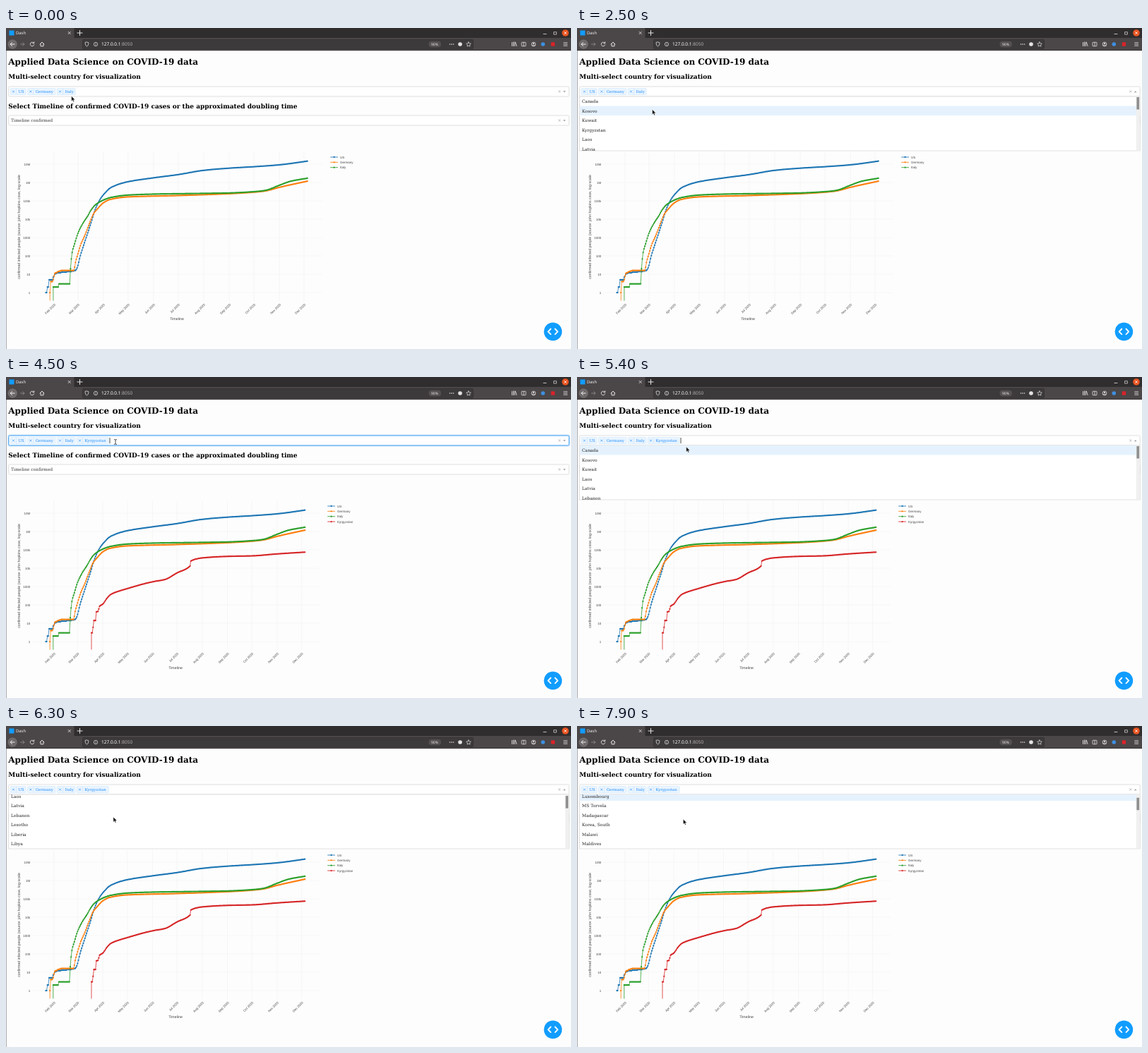
Write an HTML page that moves like this. It is 800 by 455 pixels and loops after 8 s.

```html
<!DOCTYPE html>
<html lang="en">
<head>
<meta charset="utf-8">
<title>Dash</title>
<style>
html, body { margin: 0; width: 100%; height: 100%; overflow: hidden; background: #fefdfe; }
svg { display: block; width: 100vw; height: 100vh; }
text { font-family: "DejaVu Serif", serif; text-rendering: geometricPrecision; white-space: pre; }
.ui text { font-family: "Noto Sans", sans-serif; }
.chart text { font-family: "Liberation Sans", Arial, sans-serif; font-size: 4.5px; fill: #444; }
.line { fill: none; stroke-linecap: round; stroke-linejoin: round; }
</style>
</head>
<body>
<svg id="stage" viewBox="0 0 800 455"></svg>
<script>
const LOOP = 8000, ROW = 13.5, LIST_TOP = 97;

// Markup helpers
const text = (x, y, size, fill, str, extra = '') =>
  `<text x="${x}" y="${y}" font-size="${size}" fill="${fill}" ${extra}>${str}</text>`;
const rect = (x, y, w, h, fill, extra = '') =>
  `<rect x="${x}" y="${y}" width="${w}" height="${h}" fill="${fill}" ${extra}/>`;
const circle = (x, y, r, fill, extra = '') => `<circle cx="${x}" cy="${y}" r="${r}" fill="${fill}" ${extra}/>`;
const line = (d, stroke, width = 1, extra = '') =>
  `<path class="line" d="${d}" stroke="${stroke}" stroke-width="${width}" ${extra}/>`;
const group = (id, body, extra = '') => `<g id="${id}" ${extra}>${body}</g>`;
const cross = (x, y, r, stroke, width) =>
  line(`M${x - r} ${y - r}l${2 * r} ${2 * r}m0 ${-2 * r}l${-2 * r} ${2 * r}`, stroke, width);

// Browser window
function browser() {
  const pale = '#e6e3e4';
  return rect(0, 0, 800, 14.5, '#302d2e') + rect(0, 0, 96.5, 14.5, '#4b4748') +
    rect(0, 14, 800, 18, '#4b4748') + rect(0, 31.5, 800, .6, '#2a2728') +
    rect(4.5, 3.5, 7, 7, '#119dff') +
    text(14, 9.4, 5.9, '#f4f2f3', 'Dash', 'id="tabTitle"') +
    cross(89.7, 7, 1.7, pale, .8) + line('M101 7h7M104.500 3.500v7', pale, 1) +
    line('M761 8.500h4', pale, .8) + line('M776 5.700h3.400v3.400h-3.400z', pale, .7) +
    circle(792, 7, 4.8, '#e95420') + cross(792, 7, 1.5, '#fff', .8) +
    circle(9.2, 23, 6.2, '#6d696a', 'stroke="#8a8687" stroke-width=".5"') +
    line('M12.200 23h-6m2.500-2.500l-2.500 2.500l2.500 2.500', '#f4f2f3', 1) +
    line('M20.500 23h5.500m-2.300-2.300l2.300 2.300l-2.300 2.300', '#8d898a', .9) +
    line('M39.500 21.500a2.800 2.800 0 1 0 .3 2.200m0-4v2h-2', pale, .9) +
    line('M48 23l3-3l3 3M49 22.500v3.300h4v-3.300', pale, 1) +
    rect(108.5, 16.5, 553, 13, '#3d3a3b', 'rx="1.5" stroke="#2f2c2d" stroke-width=".6"') +
    line('M114.500 20l2.400.8c0 2.500-.6 4.200-2.400 5.300c-1.800-1.100-2.400-2.800-2.400-5.300z', pale, .8) +
    circle(127, 23, 2.7, 'none', `stroke="${pale}" stroke-width=".7"`) + line('M127 23v1.300M127 21.600v.01', pale, .7) +
    text(135, 25.3, 6.5, '#fff', '127.0.0.1<tspan fill="#b3afb0">:8050</tspan>') +
    rect(598.5, 18.7, 17.5, 8.6, '#545051', 'rx="4"') + text(602, 25, 5, '#f0eeef', '90%') +
    [628.5, 631, 633.5].map(x => circle(x, 23, .8, pale)).join('') +
    circle(643, 23, 2.8, pale) +
    line('M655 19.800l1 2.100l2.300.3l-1.700 1.600l.4 2.300l-2-1.100l-2 1.100l.4-2.300l-1.700-1.600l2.300-.3z', pale, .7) +
    line('M716.500 20.500v5M718.500 20v5.500M720.300 20v5.500M721.500 20.500l1.500 5', pale, .9) +
    rect(730, 20.3, 6, 5.4, 'none', `stroke="${pale}" stroke-width=".8" rx=".6"`) + line('M733 20.500v5', pale, .8) +
    circle(747, 23, 2.9, 'none', `stroke="${pale}" stroke-width=".8"`) + circle(747, 22.2, 1.1, pale) +
    line('M745.300 24.800h3.400', pale, .8) +
    circle(760.3, 23, 2.8, '#3f8fe0') + rect(771.7, 20.3, 5.4, 5.4, '#d8232a') +
    line('M789.700 20.800h5M789.700 23h5M789.700 25.200h5', pale, .8) +
    rect(0, 32, .6, 423, '#777');
}

// Page controls
const tag = (x, w, name) =>
  rect(x, 85.6, w, 9, '#ebf5ff', 'rx=".8" stroke="#c2e0ff" stroke-width=".5"') +
  line(`M${x + 8.4} 85.600v9`, '#c2e0ff', .5) + cross(x + 4.3, 90.1, 1.2, '#1e8cff', .6) +
  text(x + 11.3, 92.1, 5.4, '#1e8cff', name);

const select = (y, id, down) =>
  rect(3.8, y, 793.4, 14, '#fff', `rx="1.600" stroke="#ccc" stroke-width=".6" id="${id}"`) +
  cross(783.7, y + 7, 1.3, '#999', .6) +
  `<path id="${id}Arrow" d="${down}" fill="#999"/>`;

const arrowDown = y => `M788.800 ${y}h3.800l-1.900 2z`;
const arrowUp = y => `M788.800 ${y + 2}h3.800l-1.900 -2z`;

// Chart data: day since 22 January, cumulative cases
const series = {
  US: { color: '#1f77b4', points: [[0,1],[1,1],[2,2],[3,2],[4,5],[7,5],[10,8],[12,11],[36,16],[38,22],[42,104],
    [48,711],[55,6400],[60,33800],[66,122e3],[70,214e3],[80,557e3],[100,11e5],[131,18e5],[161,27e5],[192,46e5],
    [223,605e4],[253,727e4],[284,92e5],[318,146e5]] },
  Germany: { color: '#ff7f0e', points: [[5,1],[6,4],[8,4],[11,11],[21,16],[34,16],[36,44],[39,130],[43,482],
    [47,1176],[53,5795],[58,19800],[63,37300],[70,77900],[79,122e3],[100,164e3],[161,195e3],[223,245e3],
    [253,296e3],[267,348e3],[284,545e3],[318,118e4]] },
  Italy: { color: '#2ca02c', points: [[9,2],[15,2],[16,3],[29,3],[30,20],[32,155],[35,453],[39,1694],[45,5883],
    [51,15100],[55,31500],[60,59e3],[70,11e4],[80,156e3],[100,207e3],[131,233e3],[223,27e4],[253,317e3],
    [267,372e3],[284,709e3],[298,118e4],[318,171e4]] },
  Kyrgyzstan: { color: '#d62728', points: [[56,3],[57,3],[59,14],[61,14],[62,42],[64,44],[66,84],[70,111],[75,228],
    [80,377],[100,769],[131,1817],[146,2400],[161,5500],[177,13100],[178,24600],[192,36300],[223,44e3],
    [253,47e3],[284,6e4],[318,75e3]] }
};

// Monotone cubic interpolation of log10(cases), one sample per day
function dailyLog(points) {
  const p = points.map(([d, v]) => [d, Math.log10(v)]);
  const slope = i => (p[i + 1][1] - p[i][1]) / (p[i + 1][0] - p[i][0]);
  const tangent = p.map((_, i) => {
    if (i === 0) return slope(0);
    if (i === p.length - 1) return slope(i - 1);
    const a = slope(i - 1), b = slope(i);
    return a * b > 0 ? 2 * a * b / (a + b) : 0;
  });
  const out = [];
  for (let d = p[0][0], i = 0; d <= p[p.length - 1][0]; d++) {
    while (i < p.length - 2 && d > p[i + 1][0]) i++;
    const h = p[i + 1][0] - p[i][0], u = (d - p[i][0]) / h, w = 1 - u;
    let y = w * w * (1 + 2 * u) * p[i][1] + u * u * (3 - 2 * u) * p[i + 1][1] +
      h * u * w * (w * tangent[i] - u * tangent[i + 1]);
    if (y < 1.5) y = Math.log10(Math.round(10 ** y));
    out.push([d, y]);
  }
  return out;
}

function chart(id, names, perDay, right, legendX) {
  const X = d => 56.4 + d * perDay, Y = log => 375 - 26 * log;
  const months = ['Feb', 'Mar', 'Apr', 'May', 'Jun', 'Jul', 'Aug', 'Sep', 'Oct', 'Nov', 'Dec'];
  let body = rect(30, 174, 480, 245, '#fefdfe');
  months.forEach((m, i) => {
    const x = X((Date.UTC(2020, i + 1, 1) - Date.UTC(2020, 0, 22)) / 864e5);
    body += line(`M${x} 176V386.500`, '#eee', .5) +
      text(0, 0, 4.5, '#444', m + ' 2020', `text-anchor="end" transform="translate(${x + 2.4} 392.500) rotate(-45)"`);
  });
  ['1', '10', '100', '1000', '10k', '100k', '1M', '10M'].forEach((label, i) => {
    body += line(`M36.500 ${Y(i)}H${right}`, '#eee', .5) +
      text(34.2, Y(i) + 1.6, 4.5, '#444', label, 'text-anchor="end"');
  });
  let traces = '';
  names.forEach((name, i) => {
    const { color, points } = series[name];
    const at = dailyLog(points).map(([d, v]) => `${X(d).toFixed(2)} ${Y(v).toFixed(2)}`);
    const drop = points[0][0] ? `M${X(points[0][0])} 400L` : 'M';
    traces += line(drop + at.join('L'), color, .8) + line(at.map(p => `M${p}h.01`).join(''), color, 2.25);
    const y = 183 + i * 7.35;
    body += line(`M${legendX} ${y}h10`, color, .85) + circle(legendX + 5, y, 1.15, color) +
      text(legendX + 13.4, y + 1.6, 4.5, '#444', name);
  });
  body += `<g clip-path="url(#plotClip)">${traces}</g>` +
    text((36.5 + right) / 2, 413.6, 5.25, '#444', 'Timeline', 'text-anchor="middle" style="font-size:5.25px"') +
    text(0, 0, 5.25, '#444', 'confirmed infected people (source: john hopkins csse, log-scale',
      'text-anchor="middle" style="font-size:5.25px" transform="translate(20 282) rotate(-90)"');
  return group(id, body, 'class="chart"');
}

function modebar() {
  const icons = [370, 382, 391, 400, 410, 423, 432, 441, 450, 463, 473, 482, 494];
  return icons.map(x => rect(x - 2.5, 140.5, 5, 4.5,
    x === 382 || x === 482 ? '#c4c4c8' : x === 494 ? '#d3d5e0' : '#f1f1f3', 'rx=".8"')).join('');
}

const before = ['Canada', 'Kosovo', 'Kuwait', 'Kyrgyzstan', 'Laos', 'Latvia', 'Lebanon'];
const after = ['Canada', 'Kosovo', 'Kuwait', 'Laos', 'Latvia', 'Lebanon', 'Lesotho', 'Liberia', 'Libya',
  'Liechtenstein', 'Lithuania', 'Luxembourg', 'MS Torvela', 'Madagascar', 'Korea, South', 'Malawi', 'Maldives',
  'Mali', 'Malta'];
const options = (id, names) =>
  group(id, names.map((n, i) => text(7, LIST_TOP + 9 + i * ROW, 6, '#222', n)).join(''));

const stage = document.getElementById('stage');
stage.innerHTML =
  `<defs><clipPath id="plotClip">${rect(36.5, 176, 420, 210.5, '#000')}</clipPath>
   <clipPath id="listClip">${rect(3.5, LIST_TOP, 793.5, 77, '#000')}</clipPath></defs>` +
  rect(0, 0, 800, 455, '#fefdfe') +
  group('ui', browser(), 'class="ui"') +
  text(3.3, 51.8, 12, '#000', 'Applied Data Science on COVID-19 data', 'font-weight="bold"') +
  text(3.3, 72.4, 9, '#000', 'Multi-select country for visualization', 'font-weight="bold"') +
  text(3.3, 114, 9, '#000', 'Select Timeline of confirmed COVID-19 cases or the approximated doubling time', 'font-weight="bold"') +
  rect(2.8, 82, 795.4, 16, 'none', 'rx="2.500" stroke="#cfe6fb" stroke-width="1.200" id="glow"') +
  select(83, 'countries', arrowDown(89.3)) +
  tag(6.2, 22, 'US') + tag(30.5, 39.5, 'Germany') + tag(72.2, 26, 'Italy') + group('newTag', tag(100.2, 45, 'Kyrgyzstan')) +
  rect(0, 86, .8, 8.2, '#222', 'id="caret"') +
  select(124, 'mode', arrowDown(130.3)) + text(7, 133.1, 6, '#333', 'Timeline confirmed') +
  chart('chartThree', ['US', 'Germany', 'Italy'], 1.1645, 447.5, 459.6) +
  chart('chartFour', Object.keys(series), 1.1535, 443.5, 455.6) +
  group('modebar', modebar()) +
  circle(774.4, 430.4, 12.8, '#119dff') +
  line('M771.300 426.500l-3.700 3.800l3.700 3.800M777.500 426.500l3.700 3.800l-3.700 3.800', '#fff', 1.9) +
  group('list',
    rect(3.8, LIST_TOP, 793.4, 77, '#fff', 'stroke="#ccc" stroke-width=".6"') +
    `<g clip-path="url(#listClip)">` +
    group('rows', rect(4.2, LIST_TOP, 787.8, ROW, '#e5f2fe', 'id="highlight"') +
      options('before', before) + options('after', after)) + '</g>' +
    rect(791.8, 97.3, 5, 76.4, '#f0f0f0') + rect(792.4, 98, 3.7, 17.5, '#8f8f8f', 'id="thumb"')) +
  group('pointer', '<path d="M0 0v7.300l1.700-1.500l1.100 2.500l1.300-.6l-1.100-2.400h2.300z" fill="#111" stroke="#fff" stroke-width=".5"/>') +
  group('beam', line('M-1.500 -3.500q1.500 0 1.500 .8v5.400q0 .8 1.500 .8M1.500 -3.500q-1.500 0-1.500 .8M0 2.700q0 .8-1.500 .8', '#222', .8));

// Timelines: [ms, values...]
const pointerPath = [[100, 92.6, 96.5], [900, 105, 91], [1500, 105, 91], [2000, 106.8, 110], [2400, 106.8, 110],
  [3100, 104.8, 148], [3800, 104.8, 148], [4400, 155, 92], [5300, 155, 92], [5800, 153.3, 126.5], [6000, 153.3, 126.5],
  [6500, 151, 130.5], [7300, 151, 130.5], [7500, 150.3, 132]];
const scrollPath = [[5900, 0], [6000, 5.2], [6300, 45], [6600, 62], [6800, 80], [7000, 97.3], [7400, 122], [7500, 122], [7900, 153]];
const highlights = [[0, 0], [2500, 1], [2750, 2], [3000, 3], [3300, 0], [5600, 1], [5750, 2], [7400, 11]];
const caretOn = [[1600, 2400], [4300, 5100], [5300, 5900], [6800, 7600]];

function along(path, t, col) {
  const i = path.findIndex(k => k[0] > t);
  if (i === 0) return path[0][col];
  if (i < 0) return path[path.length - 1][col];
  const a = path[i - 1], b = path[i];
  return a[col] + (b[col] - a[col]) * (t - a[0]) / (b[0] - a[0]);
}
const $ = id => document.getElementById(id);
const show = (id, on) => $(id).style.display = on ? '' : 'none';
const within = (t, a, b) => t >= a && t < b;

function draw(t) {
  const picked = t >= 3300, redrawn = t >= 3900;
  const open = within(t, 1600, 3300) || t >= 5300;
  const focused = within(t, 3300, 5300);
  const scroll = along(scrollPath, t, 1);
  const x = along(pointerPath, t, 1), y = along(pointerPath, t, 2);
  const overField = within(y, 84, 95);

  $('tabTitle').textContent = picked && !redrawn ? 'Updating...' : 'Dash';
  show('newTag', picked);
  show('glow', focused);
  $('countries').setAttribute('stroke', focused ? '#2f97ef' : '#ccc');
  $('countries').setAttribute('stroke-width', focused ? 1 : .6);
  $('countriesArrow').setAttribute('d', open ? arrowUp(89.3) : arrowDown(89.3));
  $('caret').setAttribute('x', picked ? 146.6 : 99.8);
  show('caret', caretOn.some(([a, b]) => within(t, a, b)));
  show('chartThree', !redrawn);
  show('chartFour', redrawn);
  show('modebar', within(t, 3300, 4400));
  $('modebar').setAttribute('opacity', t < 4200 ? 1 : .5);

  show('list', open);
  show('before', !picked);
  show('after', picked);
  $('rows').setAttribute('transform', `translate(0 ${-scroll})`);
  $('thumb').setAttribute('y', 98 + scroll * .024);
  const row = highlights.filter(k => k[0] <= t).pop()[1];
  $('highlight').setAttribute('y', LIST_TOP + row * ROW);

  show('pointer', !overField);
  show('beam', overField);
  $(overField ? 'beam' : 'pointer').setAttribute('transform', `translate(${x} ${y})`);
}

const start = performance.now();
(function tick() {
  const t = (performance.now() - start) % LOOP;
  draw(Math.floor(t / 100) * 100);
  requestAnimationFrame(tick);
})();
</script>
</body>
</html>
```
